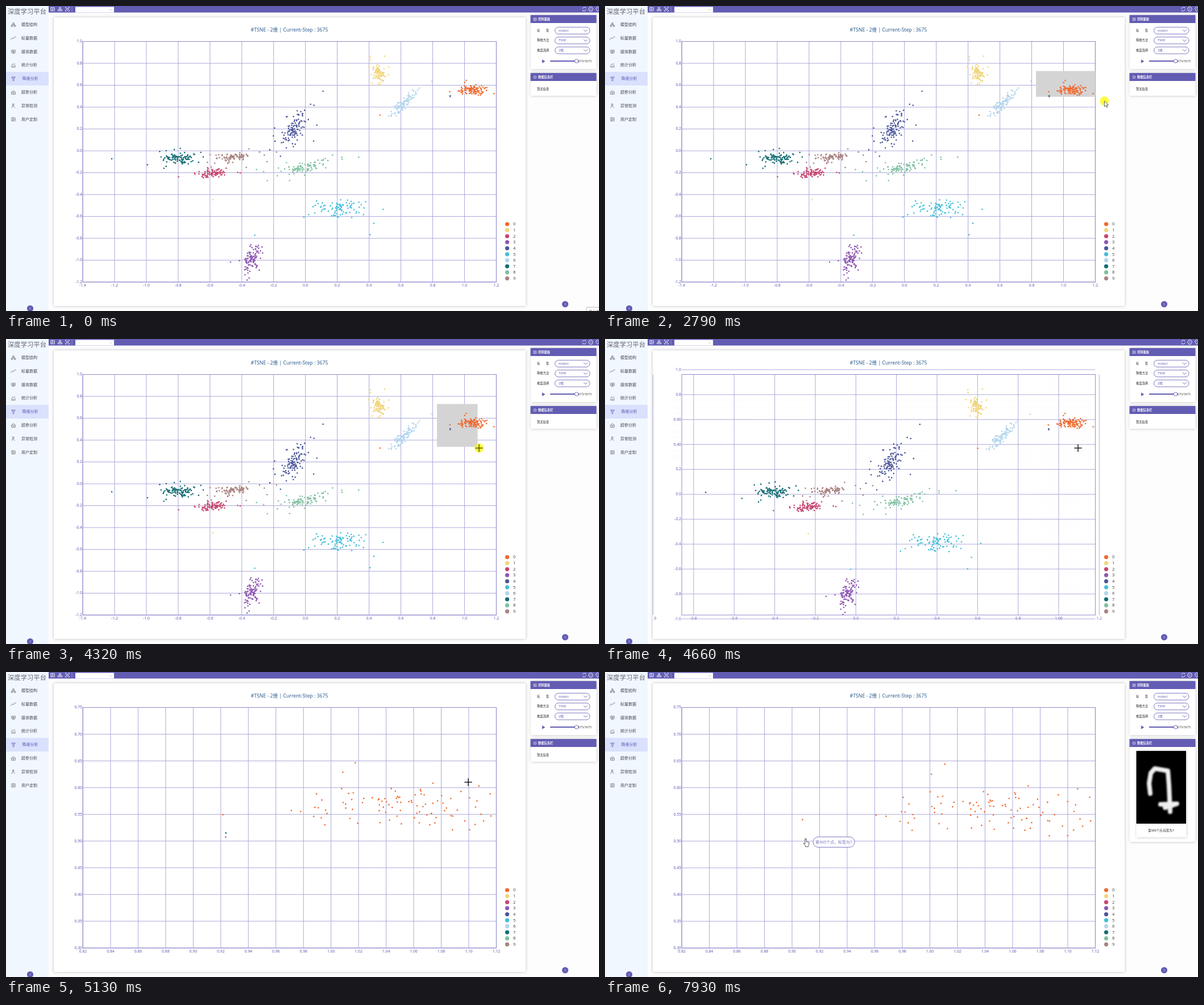
Recreate the animation shown at these times as an HTML page with a canvas. Size 1043 by 537 pixels, loop 7.99 s.

```html
<!DOCTYPE html>
<html lang="zh">
<head>
<meta charset="utf-8">
<style>
html, body { margin: 0; width: 100%; height: 100%; overflow: hidden; background: #fdfdfe; }
canvas { display: block; }
</style>
</head>
<body>
<canvas id="stage" width="1043" height="537"></canvas>
<script>
const g = document.getElementById('stage').getContext('2d');
const LOOP = 7990, PURPLE = '#625cb3', INK = '#5f5cb5', GRID = '#a3a0d6';
const FONT = '"Noto Sans", "Noto Sans CJK SC", "Noto Sans CJK", sans-serif';
const COLORS = ['#f0692d', '#f1d57d', '#c7466f', '#8e57b2', '#4c569a',
  '#43bfd9', '#b1d5ec', '#136d72', '#80c1a1', '#a98481'];
const L = 135, R = 862.4, T = 62.5, B = 486;
const DRAG = 2400, ZOOM = 4520, HOVER = 6790, DETAIL = 7660;

// ---------- helpers ----------
const lerp = (a, b, k) => a + (b - a) * k;
const clamp = k => Math.max(0, Math.min(1, k));
const smooth = k => k * k * (3 - 2 * k);
const cubic = k => k < .5 ? 4 * k ** 3 : 1 - 4 * (1 - k) ** 3;
const phase = (t, start, length) => cubic(clamp((t - start) / length));

function text(s, x, y, size, color, align = 'left', weight = 400) {
  g.font = `${weight} ${size}px ${FONT}`;
  g.fillStyle = color;
  g.textAlign = align;
  g.textBaseline = 'middle';
  g.fillText(s, x, y);
}
function rect(x, y, w, h, color) {
  g.fillStyle = color;
  g.fillRect(x, y, w, h);
}
function card(x, y, w, h) {
  g.save();
  g.shadowColor = 'rgba(0,0,0,.25)';
  g.shadowBlur = 5;
  rect(x, y, w, h, '#fff');
  g.restore();
}
function line(color, width, ...pts) {
  g.strokeStyle = color;
  g.lineWidth = width;
  g.beginPath();
  for (let i = 0; i < pts.length; i += 2) g.lineTo(pts[i], pts[i + 1]);
  g.stroke();
}
function disc(x, y, r, color) {
  g.fillStyle = color;
  g.beginPath();
  g.arc(x, y, r, 0, 7);
  g.fill();
}
function pill(x, y, w, h) {
  g.fillStyle = '#fff';
  g.strokeStyle = '#706bbb';
  g.lineWidth = .9;
  g.beginPath();
  g.roundRect(x, y, w, h, h / 2);
  g.fill();
  g.stroke();
}
function icon(path, x, y, color, scale = 1, fill) {
  g.save();
  g.translate(x, y);
  g.scale(scale, scale);
  const p = new Path2D(path);
  if (fill) { g.fillStyle = fill; g.fill(p); }
  g.strokeStyle = color;
  g.lineWidth = .8;
  g.stroke(p);
  g.restore();
}
// d points sideways: -1 left, 1 right
function arrowButton(x, y, d) {
  disc(x, y, 5.6, PURPLE);
  line('#d5d3ee', .8, x - d, y - 2, x + d, y, x - d, y + 2);
}
function chevron(x, y, size, color) {
  line(color, .9, x - size, y - size / 2, x, y + size / 2, x + size, y - size / 2);
}
function clipTo(x, y, w, h, draw) {
  g.save();
  g.beginPath();
  g.rect(x, y, w, h);
  g.clip();
  draw();
  g.restore();
}

// ---------- scales: value -> pixel before and after the zoom ----------
const baseX = v => L + (v + 1.4) * 279.77, baseY = v => T + (1 - v) * 192.5;
const zoomX = x => L + (x - baseX(.82)) * 8.667;
const zoomY = y => T + (y - baseY(.75)) * 4.889;

// ---------- data: seeded blobs in pixels of the unzoomed plot ----------
let seed = 11;
function rnd() {
  seed = (seed * 1664525 + 1013904223) % 4294967296;
  return seed / 4294967296;
}
const bell = () => (rnd() + rnd() + rnd() - 1.5) * 2;
const dots = [];

// one dot in six strays further out; slope shears the blob
function cluster(id, n, cx, cy, sx, sy, slope, stray) {
  for (let i = 0; i < n; i++) {
    const k = i % 6 ? 1 : stray, dx = bell() * sx * k;
    dots.push([id, cx + dx, cy + dx * slope + bell() * sy * k]);
  }
}
cluster(8, 90, 524, 284, 17, 5, -.3, 3);
cluster(5, 92, 585, 356, 19, 7, -.05, 3);
cluster(7, 96, 304, 268, 14, 4.5, 0, 2.4);
cluster(2, 86, 363, 294, 11, 3.5, -.12, 2.4);
cluster(9, 92, 402, 265, 12, 2.7, -.06, 2.6);
cluster(4, 110, 507, 217, 10, 9, -.7, 2.6);
cluster(3, 104, 432, 445, 7, 9.5, -1, 2.2);
cluster(1, 92, 656, 119, 4.5, 7, 0, 2.2);
cluster(6, 100, 702, 169, 11, 5, -.9, 1.7);
cluster(0, 100, 820.5, 147, 9.5, 4.4, 0, 1.6);
dots.push([7, 186, 269], [1, 364, 341], [0, 658, 192], [0, 780.6, 151],
  [7, 781.25, 158], [3, 781.2, 159.6]);

// ---------- page ----------
const GRID_ICON = 'M-3.2-3h6.4v6h-6.4zM-.8-3v6M-.8 0h4';
const MENU = [
  ['模型结构', 'M-1.2-3.5h2.4v2.4h-2.4zM-4 1h2.6v2.4h-2.6zM1.4 1h2.6v2.4h-2.6zM0-1v1M-2.7 1v-1h5.4v1'],
  ['标量数据', 'M-5 3l3-4 2 2 3-4 2 1'],
  ['媒体数据', 'M-3.5-3h7v4.5h-7zM-2 3h4M-2-1.5h4M-2 0h4'],
  ['统计分析', 'M-3 3.5v-4M0 3.5v-3M3 3.5v-4.5M-3-1l2-1.5 1.5 1 2.5-2M-3.5 3.5h7'],
  ['降维分析', 'M-3.5-3.5h7l-2.5 4v3h-2v-3zM-2-1.5h4'],
  ['超参分析', 'M-3.5 3.5v-4l3.5-3 3.5 3v4zM-3.5 0h7M0 3.5v-3'],
  ['异常检测', 'M-1.5-3.5h2.5v3h-2.5zM-3 3.5q0-3 3-3M1 1l2 2.5'],
  ['用户定制', GRID_ICON]
];

function sidebar() {
  rect(0, 0, 75, 537, '#f1f7fe');
  text('深度学习平台', 3, 10.5, 11.35, '#66666f', 'left', 500);
  MENU.forEach(([label, path], i) => {
    const y = 33 + i * 23.8, on = i === 4;
    if (on) rect(0, 116, 75, 24, '#d9e1fd');
    icon(path, 13, y, on ? PURPLE : '#666', .95);
    text(label, on ? 28.5 : 27, y, 7, on ? INK : '#45454c');
  });
  arrowButton(42.5, 532.5, -1);
}
function topBar() {
  rect(75, 0, 968, 11.5, PURPLE);
  icon(GRID_ICON, 82, 5.5, '#fff');
  icon('M-1.5-3h3v2.5h-3zM-3.5 1h7v2h-7zM0-.5v1.5', 95, 5.5, '#fff');
  icon('M-3.5-1.5v-2h2M1.5-3.5h2v2M3.5 1.5v2h-2M-1.5 3.5h-2v-2M-1.5-1.5h3v3h-3z', 108, 5.5, '#fff');
  line('#aaa6da', .7, 116, 1, 116, 10);
  rect(122, 1.5, 68, 10, '#fff');
  text('.', 129, 5, 6, '#888');
  chevron(184, 6.5, 2, '#bbb');
  icon('M-3-.5a3 3 0 0 1 5.5-1.5v-1.5M3 .5a3 3 0 0 1-5.5 1.5v1.5', 1017, 5.5, '#fff');
  icon('M-1.8-3.2h3.6l1.8 3.2-1.8 3.2h-3.6l-1.8-3.2zM-1 0h2', 1028.5, 5.5, '#fff', 1.1);
  icon('M0 4l-2.6-4a2.8 2.8 0 1 1 5.2 0zM-.8-1.2h1.6', 1040.5, 5.5, '#fff');
}
function panelHead(y, label) {
  rect(922.5, y, 116, 14, PURPLE);
  text(label, 936, y + 7.3, 5.25, '#fff', 'left', 700);
}
function controls() {
  card(922.5, 16, 116, 95);
  panelHead(16, '控制面板');
  icon(GRID_ICON, 930.5, 23.3, '#fff', .75);
  [['标\u3000\u3000签', 'output'], ['降维方法', 'TSNE'], ['维度选择', '2维']].forEach(([label, value], i) => {
    const y = 43.3 + i * 17.4;
    text(label, 934, y, 5.25, '#222', 'left', 500);
    pill(965.5, y - 6, 61.5, 12);
    text(value, 972, y, 5.5, INK);
    chevron(1019.3, y, 3.3, PURPLE);
  });
  icon('M-2.5-3l5 3-5 3z', 945.5, 97.4, PURPLE, .9, PURPLE);
  text('3675/3675', 1030, 97.4, 5.3, '#444', 'right');
  line(PURPLE, 1.8, 957, 97, 1003, 97);
  disc(1003.5, 97, 3.6, PURPLE);
  disc(1003.5, 97, 2.7, '#fff');
  arrowButton(983.5, 525, 1);
}
function infoPanel(open) {
  card(922.5, 118, 116, open ? 181 : 40);
  panelHead(118, '数据信息栏');
  icon('M-3 0a3 3 0 1 0 6 0a3 3 0 1 0-6 0M-1.5 0h3', 930.5, 125.3, '#fff', .8);
  if (!open) return text('暂无信息', 934, 146, 5.25, '#111', 'left', 500);
  card(934.5, 139, 88, 152);
  rect(934.5, 139, 87.5, 128, '#000');
  g.save();
  g.lineJoin = g.lineCap = 'round';
  g.filter = 'blur(1.5px)';
  line('#f0f0f0', 8, 959, 214, 957, 196, 960, 178, 967, 170, 990, 174, 992, 200, 994, 246);
  line('#f0f0f0', 8, 977, 233, 1006, 232, 985, 239);
  g.restore();
  text('第965个点,标签为7', 978, 279.3, 5.3, '#222', 'center');
}

// ---------- chart ----------
function tick(vertical, at, label, alpha) {
  if (alpha < .004 || at < 0 || at > 1000) return;
  g.globalAlpha = alpha;
  if (vertical) {
    line(GRID, .9, at, T, at, B);
    text(label, at, 492.5, 6.8, INK, 'center');
  } else {
    line(GRID, .9, L, at, R, at);
    text(label, 134, at, 6.8, INK, 'right');
  }
}
// old ticks slide out and fade, new ones slide in; values in both stay opaque
function axis(t, vertical, base, zoom, oldMin, oldMax, min, max, step) {
  const p = phase(t, 4528, 640), started = t >= ZOOM;
  const place = v => lerp(base(v), zoom(base(v)), p);
  const isNew = v => v * 100 >= min && v * 100 <= max;
  for (let i = oldMin; i <= oldMax; i += 2)
    if (!started || !isNew(i / 10)) tick(vertical, place(i / 10), (i / 10).toFixed(1), 1 - p);
  for (let i = min; started && i <= max; i += step)
    tick(vertical, place(i / 100), (i / 100).toFixed(2), i % 20 ? p : 1);
  g.globalAlpha = 1;
}
function points(t) {
  const p = phase(t, 4606, 719);
  for (const [id, x, y] of dots)
    disc(lerp(x, zoomX(x), p), lerp(y, zoomY(y), p), 1.3, COLORS[id]);
}
function chart(t) {
  card(84, 20, 830, 508);
  text('#TSNE - 2维 | Current-Step : 3675', 498.5, 42.5, 8.7, '#2f5e91', 'center');
  clipTo(84, 20, 830, 508, () => {
    axis(t, true, baseX, zoomX, -14, 12, 82, 112, 2);
    axis(t, false, baseY, zoomY, -12, 10, 30, 75, 5);
  });
  g.strokeStyle = '#8e8acb';
  g.lineWidth = 1;
  g.strokeRect(L, T, R - L, B - T);
  if (t >= DRAG && t < ZOOM) {
    const [x, y] = pointer(Math.max(DRAG, t - 60));
    rect(758, 114.5, clamp((x - 761) / (R - 758)) * (R - 758), Math.max(0, y - 116.5), '#d4d4d4');
  }
  clipTo(L, T, R - L, B - T, () => points(t));
  COLORS.forEach((c, i) => {
    const y = 384 + i * 10.62;
    disc(881.5, y, 3.6, c);
    text(i, 894, y + .3, 7.4, '#444', 'center');
  });
}

// ---------- pointer: [time, x, y] ----------
const PATH = [[40, 1050, 545], [790, 631, 179], [850, 635, 178], [1120, 635, 178], [1430, 902, 197],
  [1780, 757.5, 114.5], [DRAG, 757.5, 114.5], [2820, 880, 168], [3130, 846, 176], [3530, 849, 185],
  [3730, 849, 185], [4320, 832, 192], [4660, 832, 192], [5130, 813, 194], [5340, 812, 200],
  [5900, 312, 328], [6130, 365, 299], [6450, 352, 295], [LOOP, 352, 295]];
function pointer(t) {
  const i = Math.max(1, PATH.findIndex(k => k[0] > t));
  const [a, x, y] = PATH[i - 1], [b, u, v] = PATH[i];
  const k = smooth(clamp((t - a) / (b - a)));
  return [lerp(x, u, k), lerp(y, v, k)];
}
function cursor(t) {
  const [x, y] = pointer(t), held = t >= DRAG && t < ZOOM;
  if (held) disc(x, y, 8, 'rgba(255,250,0,.75)');
  if (t >= HOVER) {
    icon('M-1.2 0q1.2-1.4 2.4 0v5l5 1.2v4.5l-1.2 2v2h-5.5v-1.8l-3.5-4q0-1.8 1.5-1l1.3 1.2z',
      353, 294, '#222', .93, '#fff');
  } else if (x > R || y > B) {
    icon('M0 0v11l2.6-2.4 1.8 4 1.8-.8-1.8-3.9h3.4z', x, y, '#222', .9, '#fff');
  } else {
    const color = held ? '#4a4a14' : '#111';
    line(color, 1.4, x - 6.7, y, x + 6.7, y);
    line(color, 1.4, x, y - 6.7, x, y + 6.7);
  }
}

function frame() {
  const t = performance.now() % LOOP;
  rect(0, 0, 1043, 537, '#fdfdfe');
  sidebar();
  chart(t);
  topBar();
  controls();
  infoPanel(t >= DETAIL);
  if (t < 70) {
    rect(1021, 530, 22, 7, '#fff');
    line('#aaa', .8, 1021, 537, 1021, 530.4, 1043, 530.4);
    text('显示桌面', 1025, 538, 6, '#666');
  }
  if (t >= HOVER) {
    pill(366, 290.3, 73, 18.2);
    text('第965个点，标签为7', 370, 299.8, 7, '#7975bf');
  }
  cursor(t);
  requestAnimationFrame(frame);
}
requestAnimationFrame(frame);
</script>
</body>
</html>
```
